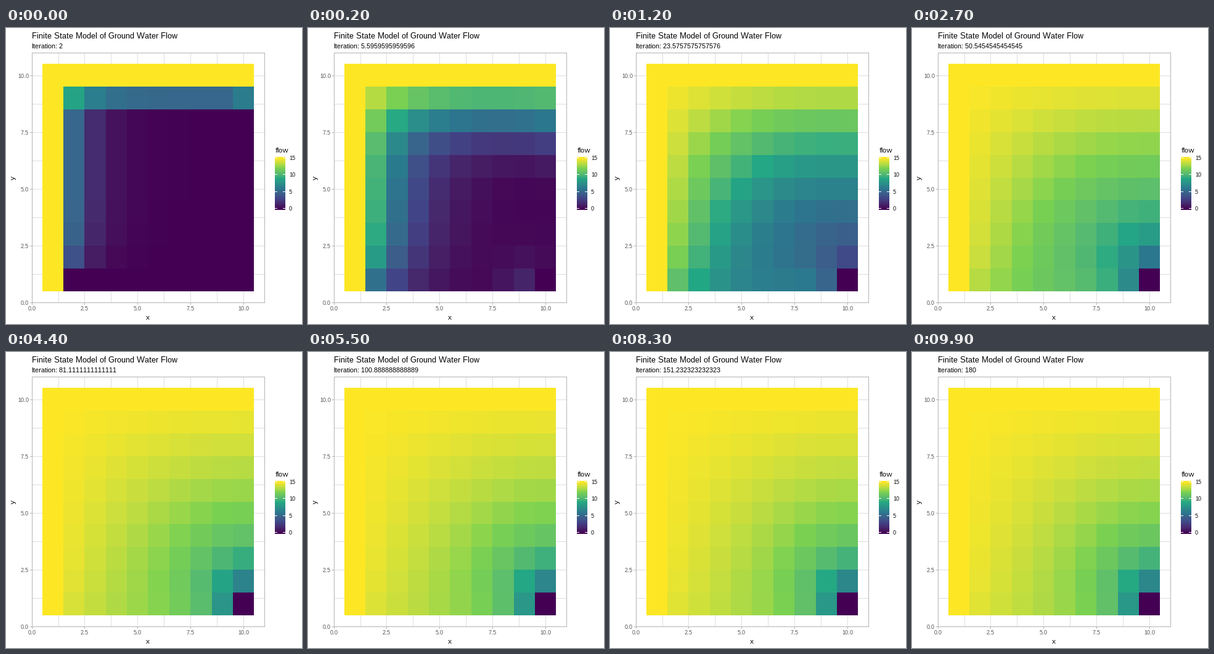
Recreate the animation shown at these times as a matplotlib script. Size 480 by 480 pixels, loop 10000 ms.

```python
import numpy as np
import matplotlib.pyplot as plt
from matplotlib.animation import FuncAnimation
from matplotlib.patches import Rectangle

FRAMES, STEPS, TOP = 100, 178, 15
PX = 0.9  # points per pixel at 80 dpi

# pixel-hinted glyphs without kerning, as on a plain bitmap device
plt.rcParams.update({"font.family": "Liberation Sans",
                     "text.hinting": "native",
                     "text.hinting_factor": 1,
                     "text.kerning_factor": 6})


# --- colour scale: six anchors blended in CIE Lab ---
ANCHORS = ["440154", "414487", "2A788E", "22A884", "7AD151", "FDE725"]
TO_XYZ = np.array([[0.4124564, 0.3575761, 0.1804375],
                   [0.2126729, 0.7151522, 0.0721750],
                   [0.0193339, 0.1191920, 0.9503041]])
WHITE = TO_XYZ.sum(axis=1)
TO_LAB = np.array([[0, 116, 0], [500, -500, 0], [0, 200, -200]])


def rgb_to_lab(rgb):
    lin = np.where(rgb > 0.04045, ((rgb + 0.055) / 1.055) ** 2.4, rgb / 12.92)
    t = lin @ TO_XYZ.T / WHITE
    f = np.where(t > 0.008856, np.cbrt(t), 7.787 * t + 16 / 116)
    return f @ TO_LAB.T - [16, 0, 0]


def lab_to_rgb(lab):
    f = (lab + [16, 0, 0]) @ np.linalg.inv(TO_LAB).T
    t = np.where(f > 0.20689, f ** 3, (f - 16 / 116) / 7.787)
    lin = np.clip(t * WHITE @ np.linalg.inv(TO_XYZ).T, 0, 1)
    return np.where(lin > 0.0031308, 1.055 * lin ** (1 / 2.4) - 0.055, 12.92 * lin)


LAB = rgb_to_lab(np.array([[int(c[i:i + 2], 16) / 255 for i in (0, 2, 4)]
                           for c in ANCHORS]))


def viridis(v):
    v = np.clip(np.asarray(v, float), 0, 1)
    stops = np.linspace(0, 1, len(LAB))
    lab = np.stack([np.interp(v, stops, LAB[:, i]) for i in range(3)], axis=-1)
    return np.clip(lab_to_rgb(lab), 0, 1)


# --- ground water model: in-place relaxation on a 10 x 10 grid ---
def sweep(h):
    """Reflecting walls at the right and bottom, each inner side counted twice."""
    for x in range(1, 10):
        if x < 9:
            h[x, 0] = (h[x, x - 1] + h[x + 1, 0] + 2 * h[x, 1]) / 4
        for y in range(1, 9):
            right = h[x + 1, y] if x < 9 else h[x - 1, y]
            h[x, y] = (h[x - 1, y] + right + h[x, y - 1] + h[x, y + 1]) / 4


def simulate():
    h = np.zeros((10, 10))
    h[0, :] = h[:, 9] = TOP
    states = []
    for _ in range(STEPS + 1):
        sweep(h)
        states.append(h.copy())
    return states


COLORS = [viridis(s / TOP) for s in simulate()]

# --- stage in pixel coordinates, y downwards ---
fig = plt.figure(figsize=(6, 6), dpi=80, facecolor="white")
ax = fig.add_axes([0, 0, 1, 1])
ax.axis("off")


def px(v):
    return int(42.155 + 34.335 * v)


def py(v):
    return int(445.7 - 36.85 * v)


def box(x0, y0, x1, y1, color, z=1):
    r = Rectangle((x0, y0), x1 - x0, y1 - y0, fc=color, lw=0,
                  antialiased=False, zorder=z)
    ax.add_patch(r)
    return r


def label(x, y, s, size, color="black", ha="left", **kw):
    return ax.text(x, y, s, fontsize=size * PX, color=color, ha=ha,
                   va="baseline", zorder=5, **kw)


GRID, EDGE, TICK = "#DEDEDE", "#B3B3B3", "#4D4D4D"
L, R, T, B = 42, 419, 40, 445

for i in range(1, 9):
    gx, gy = px(1.25 * i), py(1.25 * i)
    box(gx, T, gx + 1, B, GRID)
    box(L, gy, R, gy + 1, GRID)

tiles = [[box(px(x + 0.5), py(y + 1.5), px(x + 1.5), py(y + 0.5), "white", 2)
          for y in range(10)] for x in range(10)]

for edge in ((L, T, R + 1, T + 1), (L, B, R + 1, B + 1),
             (L, T, L + 1, B + 1), (R, T, R + 1, B + 1)):
    box(*edge, EDGE, 3)

for v in (0, 2.5, 5, 7.5, 10):
    tx, ty = px(v), py(v)
    box(tx, B, tx + 1, B + 4, EDGE, 3)
    box(L - 3, ty, L, ty + 1, EDGE, 3)
    label(tx, 458, f"{v:.1f}", 9, TICK, "center")
    label(37, ty + 4, f"{v:.1f}", 9, TICK, "right")

label(230, 473, "x", 11, ha="center")
label(15, 243, "y", 11, ha="center", rotation=90, rotation_mode="anchor")
label(42, 17, "Finite State Model of Ground Water Flow", 13)
subtitle = label(42, 33, "", 11)

# --- legend ---
label(437, 202, "flow", 11)
rows = np.arange(209, 295) + 0.5
ax.imshow(viridis((293 - rows) / 82)[:, None, :], extent=(436, 453, 295, 209),
          aspect="auto", interpolation="nearest", zorder=2)
for v in (0, 5, 10, 15):
    ly = int(292.6 - 82 * v / TOP)
    box(436, ly, 440, ly + 1, "white", 3)
    box(449, ly, 453, ly + 1, "white", 3)
    label(459, ly + 4, str(v), 9)

ax.set_xlim(0, 480)
ax.set_ylim(480, 0)


def update(k):
    subtitle.set_text(f"Iteration: {2 + k * STEPS / (FRAMES - 1):.15g}")
    n = min(int((k + 0.5) * STEPS / (FRAMES - 1)), STEPS)
    for col, colors in zip(tiles, COLORS[n]):
        for tile, c in zip(col, colors):
            tile.set_facecolor(c)


anim = FuncAnimation(fig, update, frames=FRAMES, init_func=lambda: update(0),
                     interval=100, repeat=True, repeat_delay=0)
plt.show()
```
